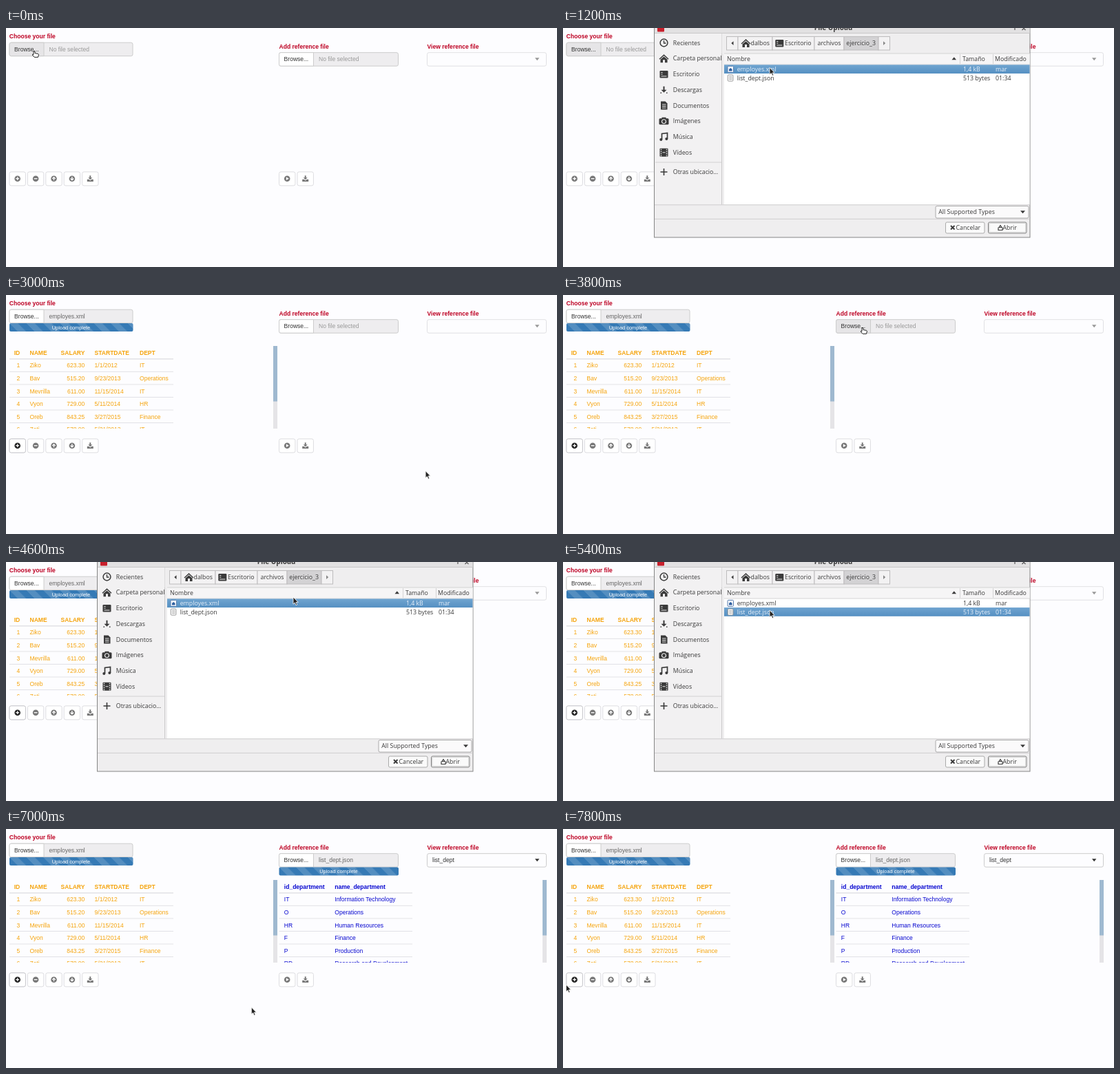
Write an HTML page that moves like this. It is 800 px wide and 347 px high and loops after 8000 ms.

```html
<!DOCTYPE html>
<html lang="en">
<head>
<meta charset="utf-8">
<title>File upload</title>
<style>
html, body { margin: 0; width: 100%; height: 100%; overflow: hidden; background: #fdfdff; }
svg { display: block; width: 100vw; height: 100vh; }
text { white-space: pre; }
.page { font: 8.55px "Liberation Sans", Arial, sans-serif; fill: #333; }
.page .bold { font-weight: bold; }
.page .label { font-weight: bold; fill: #bd0022; }
.page .bar { font-size: 7.4px; fill: #fff; }
.orange text { fill: #f5a40c; }
.blue text { fill: #0808d0; }
.dialog { font: 8.8px "Open Sans", "Noto Sans", sans-serif; fill: #3a3a3a; }
.dialog .title { font-size: 10px; font-weight: bold; }
.selected text { fill: #e9f1fa; }
.end { text-anchor: end; }
.mid { text-anchor: middle; }
</style>
</head>
<body>
<svg id="stage" viewBox="0 0 800 347" preserveAspectRatio="none"></svg>
<script>
const text = (x, y, str, cls = '', id = '') => `<text x="${x}" y="${y}" class="${cls}" id="${id}">${str}</text>`;
const rect = (x, y, w, h, fill, stroke = 'none', r = 0, id = '') =>
  `<rect x="${x}" y="${y}" width="${w}" height="${h}" fill="${fill}" stroke="${stroke}" rx="${r}" id="${id}"/>`;
const path = (d, fill = 'none', stroke = 'none', width = 1) =>
  `<path d="${d}" fill="${fill}" stroke="${stroke}" stroke-width="${width}"/>`;
const circle = (x, y, r, fill, stroke = 'none', width = 1) =>
  `<circle cx="${x}" cy="${y}" r="${r}" fill="${fill}" stroke="${stroke}" stroke-width="${width}"/>`;
const group = (content, { id = '', cls = '', x = 0, y = 0, clip = '' } = {}) =>
  `<g id="${id}" class="${cls}" transform="translate(${x} ${y})" ${clip && `clip-path="url(#${clip})"`}>${content}</g>`;

// Page widgets
function fileInput(id, x, y, width) {
  return group(
    rect(.5, .5, width, 19.5, '#eeedef', '#ccc', 2.5) +
    `<path id="${id}Button" d="M50.5 .5H3Q.5 .5 .5 3V17.5Q.5 20 3 20H50.5Z" stroke="#ccc"/>` +
    text(7.6, 13.2, 'Browse...') + text(58, 13.2, '', '', id + 'Name') +
    group(rect(0, 0, width + .5, 12, '#367ab5', 'none', 2) +
      rect(0, 0, width + .5, 12, 'url(#stripes)', 'none', 2) +
      text(width / 2, 8.7, 'Upload complete', 'bar mid'), { id: id + 'Bar', x: .5, y: 20.3 }),
    { x, y });
}

const glyphs = {
  plus: 'M-2.4 0H2.4M0 -2.4V2.4',
  minus: 'M-2.4 0H2.4',
  up: 'M0 2.6V-2M-2.3 .2L0 -2.1L2.3 .2',
  down: 'M0 -2.6V2M-2.3 -.2L0 2.1L2.3 -.2'
};
function icon(name, color) {
  if (name === 'download') {
    return path('M-1 -4.5H1V-1.5H3L0 1.6L-3 -1.5H-1Z', color) +
      path('M-4.5 1H-2L0 2.8L2 1H4.5V4.2H-4.5Z', color);
  }
  return circle(0, 0, 4.3, color) + (name === 'play'
    ? path('M-1.4 -2.4L2.6 0L-1.4 2.4Z', '#fff')
    : path(glyphs[name], 'none', '#fff', 1.3));
}
const button = (x, name, color = '#777', border = '#dcdce0') =>
  group(rect(-11.7, -9.8, 23.4, 20, '#fff', border, 2.5) + icon(name, color), { x, y: 218.7 });

const rowY = i => 105.4 + i * 18.55;
function table(id, cls, left, right, headers, rows, columns, ends) {
  let out = '';
  headers.forEach((h, c) => out += text(columns[c], 86.5, h, 'bold ' + ends[c]));
  rows.forEach((row, r) => {
    out += path(`M${left} ${rowY(r) - 12.6}H${right}`, 'none', '#dcdce0', r ? .8 : 1.3);
    row.forEach((cell, c) => out += text(columns[c], rowY(r), cell, ends[c]));
  });
  return group(out, { id, cls, clip: 'tableClip' });
}
const scrollbar = x => rect(x, 74, 6, 120, '#e5e4e7') + rect(x, 74, 6, 80.5, '#9fb9d0');

const employees = [
  ['1', 'Ziko', '623.30', '1/1/2012', 'IT'],
  ['2', 'Bav', '515.20', '9/23/2013', 'Operations'],
  ['3', 'Mevrilla', '611.00', '11/15/2014', 'IT'],
  ['4', 'Vyon', '729.00', '5/11/2014', 'HR'],
  ['5', 'Oreb', '843.25', '3/27/2015', 'Finance'],
  ['6', 'Zeti', '578.00', '5/21/2013', 'IT']
];
const departments = [
  ['IT', 'Information Technology'], ['O', 'Operations'], ['HR', 'Human Resources'],
  ['F', 'Finance'], ['P', 'Production'], ['RD', 'Research and Development']
];

const page = group(
  text(4.8, 15, 'Choose your file', 'label') +
  text(396.5, 29.5, 'Add reference file', 'label') +
  text(611.5, 29.5, 'View reference file', 'label') +
  fileInput('main', 4.5, 20.7, 179) +
  fileInput('ref', 396, 35.2, 173) +
  rect(611.5, 35.7, 173, 19.5, '#fdfdff', '#ddd', 2.5, 'select') +
  '<path id="selectArrow" d="M768 43.2H774.4L771.2 47.2Z"/>' +
  text(619, 48.4, 'list_dept', '', 'selectText') +
  group(table('', 'orange', 5, 243, ['ID', 'NAME', 'SALARY', 'STARTDATE', 'DEPT'], employees,
    [20.3, 34.5, 114.4, 128.5, 194], ['end', '', 'end', '', '']) + scrollbar(388), { id: 'mainTable' }) +
  group(table('', 'blue', 396.5, 590, ['id_department', 'name_department'], departments,
    [403.8, 477.3], ['', '']) + scrollbar(779), { id: 'refTable' }) +
  ['plus', 'minus', 'up', 'down', 'download'].map((n, i) => button(16.7 + i * 26.4, n)).join('') +
  group(button(16.7, 'plus', '#222', '#c8c8cc'), { id: 'plusActive' }) +
  button(408.2, 'play') + button(434.7, 'download'),
  { cls: 'page' });

// File chooser
const ink = '#3a3a3a';
const house = path('M-7 .5L0 -6L7 .5L6 1.6L0 -4L-6 1.6Z', ink) + path('M-5 1.6L0 -2.8L5 1.6V6H1.5V2H-1.5V6H-5Z', ink);
const desk = rect(-6, -5, 12, 10.5, ink, 'none', 1.2) + path('M-4 -2.5H-2M-4 0H-2M-4 3H4', 'none', '#eee', 1);
const places = [
  ['Recientes', circle(0, 0, 5.4, 'none', ink, 1.5) + path('M0 -3.5V.5H3', 'none', ink, 1.3)],
  ['Carpeta personal', house],
  ['Escritorio', desk],
  ['Descargas', path('M-1 -5H1V0H4L0 4L-4 0H-1Z', ink) + path('M-5 4.5H-3.5M3.5 4.5H5', 'none', ink, 1.4)],
  ['Documentos', path('M-4.5 -6H2L5 -3V6H-4.5Z', ink) + path('M-2.5 -1.5H3M-2.5 1H3M-2.5 3.5H3', 'none', '#eee', 1)],
  ['Imágenes', rect(-7, -4, 14, 9, ink, 'none', 1.5) + rect(-3, -5.5, 6, 3, ink) + circle(0, .5, 3, ink, '#eee', 1.2)],
  ['Música', path('M-3 4V-4.5L5 -5.5V3', 'none', ink, 1.7) + circle(-4.2, 4, 2, ink) + circle(3.8, 3, 2, ink)],
  ['Vídeos', rect(-6, -6, 12, 12, ink, 'none', 1) + path('M-4 -5V5.5M4 -5V5.5', 'none', '#eee', '1.4" stroke-dasharray="1.5 1.5') + path('M-2 0H2', 'none', '#eee')]
];

const crumb = (x, width, fill = '#f3f2f3') => rect(x, 12.5, width, 19.5, fill, '#bdbcbd');
const pathBar =
  crumb(237.5, 16.5) + crumb(254, 50) + crumb(304, 61) + crumb(365, 43) + crumb(408, 50, '#d3d2d4') + crumb(458, 16.5) +
  path('M247.5 19.2V25L244.3 22.1Z', ink) + path('M465 19.2V25L468.2 22.1Z', '#888') +
  group(house, { x: 265.5, y: 22 }) + group(desk, { x: 314.3, y: 22 }) +
  text(272.5, 25, 'dalbos') + text(322, 25, 'Escritorio') + text(369.5, 25, 'archivos') + text(411.3, 25, 'ejercicio_3');

function fileRow(id, y, name, size, date, mark) {
  return group(
    rect(234, 0, 443.5, 12.7, 'url(#selection)', 'none', 0, id + 'Highlight') + mark +
    text(252.7, 9.6, name) + text(581, 9.6, size) + text(628, 9.6, date), { id, y });
}
const xmlMark = rect(239, 2, 8.5, 9, '#f4f7fb', '#5a7fb0', 1) + path('M241 9V6.5L243.2 4.5L245.5 6.5V9Z', '#2f5f9f');
const jsonMark = rect(239.3, 2, 7.6, 9, '#fff', '#999', 1) + path('M241 4.5H245.5M241 6.5H245.5M241 8.5H245.5', 'none', '#999', .8);

const dialog = group(
  rect(132.5, -5, 545.5, 309, '#efeeef', '#858585') +
  rect(133, 0, 544.5, 7.5, '#e2e1e2') +
  rect(137, -3, 10, 8.5, '#c8202c', 'none', 1) +
  text(392.5, 3, 'File Upload', 'title mid') +
  path('M656 -3V3M666.5 3L669 .5L671.5 3', 'none', '#555', 1.2) +
  path('M133 7.5H677.5', 'none', '#c9c8c9') +
  rect(133.5, 8, 97, 248.5, '#f2f1f2') + path('M230.5 8V256.5', 'none', '#cbcacb') +
  places.map(([name, mark], i) =>
    group(mark, { x: 146.5, y: 21.5 + i * 22.75 }) + text(159.8, 24.5 + i * 22.75, name)).join('') +
  rect(230.5, 8, 6, 29, '#efeeef') +
  path('M134 195H230', 'none', '#d2d1d2') +
  path('M141.5 209H151.5M146.5 204V214', 'none', ink, 1.6) + text(159.8, 212, 'Otras ubicacio…') +
  pathBar +
  rect(234, 37, 443.5, 219.5, '#fff') + rect(234, 37, 443.5, 15.8, '#f6f5f6') +
  path('M234 37H677.5M234 53H677.5M576.5 38V52M624.5 38V52', 'none', '#d4d3d4') +
  text(238, 47.7, 'Nombre') + text(580, 47.7, 'Tamaño') + text(627, 47.7, 'Modificado') +
  path('M564.5 46.3H571L567.8 42.3Z', ink) +
  fileRow('xml', 53.4, 'employes.xml', '1,4 kB', 'mar', xmlMark) +
  fileRow('json', 66.1, 'list_dept.json', '513 bytes', '01:34', jsonMark) +
  path('M133 256.8H677.5M133 277.3H677.5', 'none', '#cfcecf') +
  rect(541, 258.5, 135, 17.5, '#fbfafb', '#aaa', 2) + text(545.3, 270.3, 'All Supported Types') +
  path('M664 265.3H671L667.5 269.3Z', ink) +
  rect(555.5, 282, 56.5, 16, '#fafafa', '#aaa', 2) + path('M563 287L568.5 292.5M568.5 287L563 292.5', 'none', ink, 1.9) +
  text(570.5, 293, 'Cancelar') +
  rect(617.5, 282, 55.5, 16, '#fafafa', '#7f7f7f', 2) + rect(618.8, 283.3, 53, 13.4, 'none', '#ccc', 1.5) +
  path('M632 289.5V293.5H638V289.5M633 289.5L635 286.5L637 289.5Z', 'none', ink, 1.2) +
  text(638.5, 293, 'Abrir'),
  { id: 'dialog', cls: 'dialog' });

const pointers =
  group(path('M0 0V10.2L2.4 8L4 11.8L5.7 11L4.1 7.4H7.2Z', '#222', '#fff', .8), { id: 'arrow' }) +
  group(path('M0 .9Q1 -.5 2 .9V3.6L6.5 4.4Q7.6 4.8 7.3 6.2L6.5 9.4H1.2L-1.8 6Q-1.6 4.6 0 5.6Z', '#fff', '#222', 1), { id: 'hand' });

const stage = document.getElementById('stage');
stage.innerHTML = `<defs>
  <clipPath id="tableClip"><rect y="70" width="800" height="124"/></clipPath>
  <pattern id="stripes" width="24.5" height="24.5" patternUnits="userSpaceOnUse" patternTransform="skewX(45)">
    <rect width="12.25" height="24.5" fill="#fff" fill-opacity=".15"/></pattern>
  <linearGradient id="selection" x2="0" y2="1"><stop stop-color="#70a4d0"/><stop offset="1" stop-color="#5590c2"/></linearGradient>
  </defs>` + page + dialog + pointers;

// Timeline
const LOOP = 8000, STEP = 200;
const pointerPath = [
  [0, 40, 33], [500, 40, 33], [1200, 300, 57.5], [1500, 300, 57.5], [2400, 641.5, 294], [2800, 641.5, 294],
  [3600, 434, 47], [4200, 434, 47], [4600, 417, 51], [5200, 300, 70], [5400, 300, 70],
  [6200, 631.5, 287], [6600, 631.5, 287], [7200, 260, 249], [7800, 4.5, 226]
];
function pointerAt(t) {
  const next = pointerPath.findIndex(p => p[0] > t);
  if (next < 0) return pointerPath.at(-1).slice(1);
  const [t0, x0, y0] = pointerPath[next - 1], [t1, x1, y1] = pointerPath[next];
  const k = (t - t0) / (t1 - t0), e = k * k * (3 - 2 * k);
  return [x0 + (x1 - x0) * e, y0 + (y1 - y0) * e];
}

const el = id => document.getElementById(id);
const show = (id, on) => el(id).style.display = on ? '' : 'none';
const fill = (id, color) => el(id).setAttribute('fill', color);
function setInput(id, done, hover, name) {
  show(id + 'Bar', done);
  fill(id + 'Button', hover ? '#e6e5e7' : '#fff');
  el(id + 'Name').textContent = done ? name : 'No file selected';
  el(id + 'Name').style.fill = done ? '#666' : '#999';
}

function render(t) {
  const between = (a, b) => t >= a && t < b;
  const mainDone = t >= 3000, refDone = t >= 7000, jsonSelected = t >= 5200;
  const hand = t < 600 || between(3600, 4400);

  setInput('main', mainDone, t < 2800, 'employes.xml');
  setInput('ref', refDone, between(3600, 6800), 'list_dept.json');
  show('mainTable', mainDone);
  show('plusActive', mainDone);
  show('refTable', refDone);
  show('selectText', refDone);
  fill('selectArrow', refDone ? '#333' : '#999');
  el('select').setAttribute('stroke', refDone ? '#ccc' : '#e0e0e3');

  show('dialog', between(600, 2800) || between(4400, 6800));
  for (const [id, on] of [['xml', !jsonSelected], ['json', jsonSelected]]) {
    show(id + 'Highlight', on);
    el(id).setAttribute('class', on ? 'selected' : '');
  }

  const [x, y] = pointerAt(t);
  show('hand', hand);
  show('arrow', !hand);
  el(hand ? 'hand' : 'arrow').setAttribute('transform', `translate(${x} ${y})`);
}

function tick() {
  render(Math.floor(performance.now() % LOOP / STEP) * STEP);
  requestAnimationFrame(tick);
}
tick();
</script>
</body>
</html>
```
